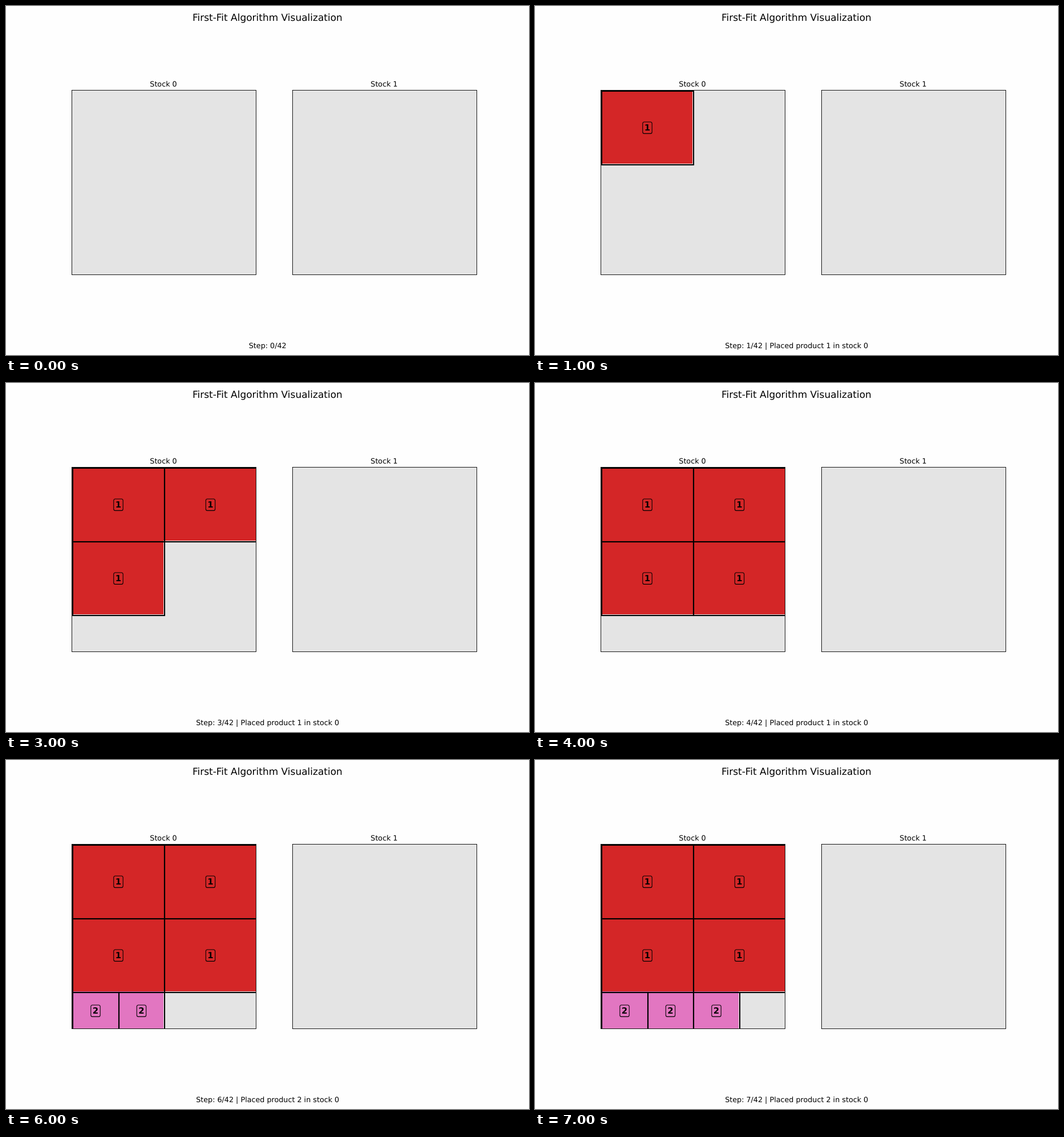
An HTML page for the animation above (8 s loop, 917 by 611 pixels).

```html
<!DOCTYPE html>
<html lang="en">
<head>
<meta charset="utf-8">
<title>First-Fit Algorithm Visualization</title>
<style>
  html, body { margin: 0; width: 100%; height: 100%; overflow: hidden; background: #fefefe; }
  svg { display: block; width: 917px; height: 611px; }
  text { font: 12.74px "DejaVu Sans", sans-serif; text-anchor: middle; text-rendering: geometricPrecision; }
  .title { font-size: 16.98px; }
  .tag { font-size: 14.86px; font-weight: bold; }
  .line { fill: none; stroke: #000; }
</style>
</head>
<body>
<svg id="stage" viewBox="0 0 917 611">
  <clipPath id="clip"><rect x="115" y="148" width="323" height="322"/></clipPath>
</svg>
<script>
const STEP = 1000, STEPS = 8, TOTAL = 42;
const BINS = [115, 502], TOP = 147, SIZE = 323;
const COLORS = { 1: '#d42627', 2: '#e276c1' };
const EMPTY = '#e4e4e4', GAP = '#f4f4f4';

// product, left, top, right, bottom of each filled area, in order of placement
const PIECES = [
  [1, 115, 147, 276, 276],
  [1, 276, 147, 438, 276],
  [1, 115, 276, 276, 405],
  [1, 276, 276, 438, 405],
  [2, 115, 405, 196, 470],
  [2, 196, 405, 276, 470],
  [2, 276, 405, 357, 470]
];

const stage = document.getElementById('stage');

function add(parent, tag, attrs, text) {
  const el = document.createElementNS('http://www.w3.org/2000/svg', tag);
  for (const key in attrs) el.setAttribute(key, attrs[key]);
  if (text !== undefined) el.textContent = text;
  return parent.appendChild(el);
}

const box = (parent, x, y, width, height, attrs) =>
  add(parent, 'rect', { x, y, width, height, ...attrs });

const label = (parent, x, y, text, cls = '') =>
  add(parent, 'text', { x, y, class: cls }, text);

label(stage, 458.4, 26, 'First-Fit Algorithm Visualization', 'title');
BINS.forEach((x, i) => {
  box(stage, x, TOP, SIZE, SIZE, { fill: EMPTY });
  label(stage, x + 161, 141, 'Stock ' + i);
});

const fills = add(stage, 'g', { 'clip-path': 'url(#clip)' });
const outlines = add(stage, 'g', { 'clip-path': 'url(#clip)' });
const tags = add(stage, 'g', {});

const placed = PIECES.map(([id, x0, y0, x1, y1]) => {
  const w = x1 - x0, h = y1 - y0;
  const fill = add(fills, 'g', {});
  box(fill, x0, y0, w + 1, h + 1, { fill: GAP });
  box(fill, x0, y0, w, h, { fill: COLORS[id] });

  // outlines sit two pixels right of and below the filled area
  const outline = box(outlines, x0 + 2, y0 + 2, w, h, { class: 'line', 'stroke-width': 2.1 });

  const tag = add(tags, 'g', {});
  const cx = (x0 + x1) / 2 + 1.5, cy = y0 + (id === 1 ? 66.2 : 34.2);
  box(tag, cx - 8.2, cy - 10.2, 16.4, 20.4, { rx: 3, class: 'line', 'stroke-width': 1.06 });
  label(tag, cx, cy + 4.9, id, 'tag');
  return [fill, outline, tag];
});

BINS.forEach(x => box(stage, x + 0.5, TOP + 0.5, SIZE, SIZE, { class: 'line', 'stroke-width': 0.9 }));
const caption = label(stage, 458.7, 599, '');

let shown = -1;
function draw(now) {
  const step = Math.floor(now / STEP) % STEPS;
  if (step !== shown) {
    shown = step;
    placed.forEach((parts, i) => parts.forEach(el => {
      el.style.display = i < step ? '' : 'none';
    }));
    caption.textContent = `Step: ${step}/${TOTAL}` +
      (step ? ` | Placed product ${PIECES[step - 1][0]} in stock 0` : '');
  }
}

const start = performance.now();
function tick() {
  draw(performance.now() - start);
  requestAnimationFrame(tick);
}
tick();
</script>
</body>
</html>
```
